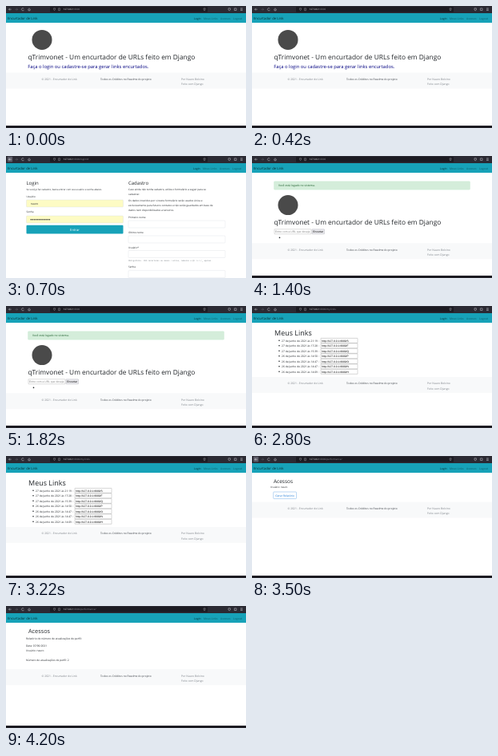
An HTML page that plays this animation: 300x153 px, repeating every 4.9 s.

```html
<!DOCTYPE html>
<html lang="pt">
<head>
<meta charset="utf-8">
<title>Encurtador de Link</title>
<style>
html, body { margin: 0; width: 100%; height: 100%; overflow: hidden; background: #fff; }
svg { display: block; width: 100%; height: 100%; }
text { font-family: "Open Sans", "Noto Sans", sans-serif; text-rendering: geometricPrecision; white-space: pre; }
.field { font-family: "Liberation Sans", Arial, sans-serif; }
.mono { font-family: "Noto Sans Mono", "DejaVu Sans Mono", monospace; }
</style>
</head>
<body>
<svg id="stage" viewBox="0 0 300 153" preserveAspectRatio="none"></svg>
<script>
const STEP = 700;
const INK = '#212529', TEAL = '#17a2b8', GRAY = '#7b8187';
const USER = 'nauro';

const text = (x, y, size, str, fill = INK, extra = '') =>
  `<text x="${x}" y="${y}" font-size="${size}" fill="${fill}" ${extra}>${str}</text>`;
const rect = (x, y, w, h, fill, stroke = 'none', r = 0, sw = .3) =>
  `<rect x="${x}" y="${y}" width="${w}" height="${h}" rx="${r}" fill="${fill}" stroke="${stroke}" stroke-width="${sw}"/>`;
const dot = (x, y, r, fill) => `<circle cx="${x}" cy="${y}" r="${r}" fill="${fill}"/>`;
const stroke = (d, color, w = .5) => `<path d="${d}" fill="none" stroke="${color}" stroke-width="${w}"/>`;

function browserBar(path, hover) {
  const icon = '#c9c9d0';
  return rect(0, 0, 300, 9, '#2b2a33') + rect(55, 1, 197, 6.8, '#1c1b22', 'none', .8) +
    (hover ? rect(1.8, .8, 6.4, 6.6, '#5b5a66', 'none', .8) : '') +
    stroke('M6.7 4.2H3.6M4.9 2.8L3.5 4.2L4.9 5.6', hover ? '#fff' : icon) +
    stroke('M11.4 4.2h3.1M13.2 2.8L14.6 4.2L13.2 5.6', '#66656f') +
    stroke('M22.2 3.2A1.6 1.6 0 1 0 22.5 4.8', icon) +
    stroke('M27.4 4.3L29 2.8L30.6 4.3M28 4v1.8h2V4', icon) +
    stroke('M59.6 2.8h1.9v1.6l-.95 1.3l-.95-1.3zM65.6 2.8h1.8v2.9h-1.8zM247 2.9h2.2l-.5 2.7h-1.2z', '#a5a5ae', .45) +
    text(71.8, 5.3, 3, `127.0.0.1<tspan fill="#8f8f98">:8000${path}</tspan>`, '#f4f4f8') +
    stroke('M278 2.8h2.4v2.2l-1.2 .8l-1.2-.8zM285.4 2.9h2.6v2.6h-2.6zM293 2.9h2.8M293 4.2h2.8M293 5.5h2.8', icon);
}

function navBar(shift = 0) {
  const items = [['Login', 235], ['Meus Links', 247], ['Acessos', 268], ['Logout', 284]];
  return rect(0, 9, 300, 12, TEAL) + text(2, 17, 4.25, 'Encurtador de Link', '#082a30') +
    items.map(([label, x], i) => text(x - shift, 16.7, 3.4, label, i ? '#0f5d6a' : '#06272d')).join('');
}

function footer(top) {
  return rect(0, top, 300, 20, '#f8f9fa') +
    text(44.5, top + 9.3, 3.4, '© 2021 - Encurtador de Link', GRAY) +
    text(118, top + 9.3, 3.36, 'Todos os Créditos no Readme do projeto', '#3f444a') +
    text(219, top + 9.3, 3.4, 'Por Nauro Belvino', GRAY) +
    text(219, top + 15.6, 3.4, 'Feito com Django', GRAY);
}

const page = (path, body, footerTop, hover) =>
  navBar() + browserBar(path, hover) + body + footer(footerTop) + rect(0, 150, 300, 3, '#1c1b22');

const banner = y => dot(45, y - 24.5, 12.5, '#4a4a4a') +
  text(27.5, y, 8.35, 'qTrimvonet - Um encurtador de URLs feito em Django');

const shortenForm = y => rect(28, y, 46, 6, '#fff', '#8a8a8a', .3) +
  text(29, y + 4.1, 3.4, 'Entre com a URL que deseja', '#858585', 'class="field"') +
  rect(75, y, 15.5, 6, '#e9e9ed', '#8f8f9d', .4) +
  text(82.7, y + 4.1, 3.4, 'Encurtar', '#000', 'class="field" text-anchor="middle"');

const linkBox = (x, y, code) => rect(x, y, 46, 5.9, '#fff', '#777', .3) +
  text(x + 1.3, y + 4.1, 3.3, 'http://127.0.0.1:8000/' + code, '#000', 'class="field"');

const formBox = (x, y, fill = '#fff') => rect(x, y, 121, 9, fill, '#ced4da', .9);

function loginPage() {
  const small = (x, y, str) => text(x, y, 3.1, str);
  const about = [
    [43.1, 'Caso ainda não tenha cadastro, utilize o formulário a seguir para se'],
    [49.1, 'cadastrar.'],
    [57.1, 'Os dados inseridos por si neste formulário serão usados única e'],
    [63.1, 'exclusivamente para futuros contatos e não serão guardados em base de'],
    [69.1, 'dados nem disponibilizados a terceiros.']];
  const fields = [['Primeiro nome', 78, 81], ['Último nome', 97, 100], ['Usuário*', 115.6, 118.5], ['Senha', 140.2, 143.6]];
  let dots = '';
  for (let i = 0; i < 12; i++) dots += dot(31.3 + i * 2.1, 79.7, .75, INK);
  return navBar(1) + browserBar('/login/#', true) +
    text(25.5, 36.2, 6, 'Login') + text(153, 36.2, 6, 'Cadastro') +
    text(25.5, 43.1, 2.95, 'Se você já fez cadastro, basta entrar com seu usuário e senha abaixo.') +
    small(25.5, 51.7, 'Usuário') + formBox(25.5, 55, '#fdfbc4') + text(31, 60.8, 3.3, USER) +
    small(25.5, 71.1, 'Senha') + formBox(25.5, 75, '#fdfbc4') + dots +
    rect(25.5, 86.8, 121, 10.6, TEAL, 'none', .9) +
    text(86, 93.6, 4.1, 'Entrar', '#fff', 'text-anchor="middle"') +
    about.map(([y, str]) => small(153, y, str)).join('') +
    fields.map(([label, y, top]) => small(153, y, label) + formBox(153, top)).join('') +
    text(153, 131.8, 2.4, 'Obrigatório. 150 caracteres ou menos. Letras, números e @/./+/-/_ apenas.', GRAY, 'class="mono"');
}

function linksBody() {
  const links = [
    ['27', '21:19', 'S'], ['27', '17:28', 'F'], ['27', '15:39', 'Q'], ['26', '14:50', 'P'],
    ['26', '14:47', 'O'], ['26', '14:47', 'N'], ['26', '14:09', 'H']];
  return text(28, 36.7, 9, 'Meus Links') + links.map(([day, hour, code], i) => {
    const y = 43.2 + i * 6.5;
    return dot(34, y, .8, INK) + text(37, y + 1.3, 3.3, `${day} de Junho de 2021 às ${hour} :`) +
      linkBox(86, y - 2.8, code);
  }).join('');
}

const reportForm = text(27, 33.8, 6.5, 'Acessos') +
  text(23, 40.4, 3.1, 'Usuário: ' + USER) +
  rect(26.7, 45, 28.8, 8.6, '#fff', '#3a8dde', .9, .35) +
  text(41.1, 50.6, 3.35, 'Gerar Relatório', '#1a78d6', 'text-anchor="middle"');

const report = text(28, 33.6, 7.3, 'Acessos') +
  [[42.3, 'Relatório de número de atualizações de perfil:'], [51.4, 'Data: 07/06/2021'],
   [57, 'Usuário: ' + USER], [68.9, 'Número de atualizações de perfil: 2']]
    .map(([y, str]) => text(25, y, 3.25, str)).join('');

const scenes = [
  page('', banner(66.9) +
    text(27.2, 78, 5.85, 'Faça o login ou cadastre-se para gerar links encurtados.', '#000080'), 83.6),
  loginPage(),
  page('', rect(27.5, 31.8, 245, 10.4, '#d4edda', '#c3e6cb', .9) +
    text(33, 38.3, 3.4, 'Você está logado no sistema.', '#155724') +
    banner(86.1) + shortenForm(91.8) + dot(34.5, 102.4, .8, INK), 109.3),
  page('', banner(66.1) + shortenForm(71.8) + dot(33.8, 83, .8, INK) +
    text(37, 84.2, 3.3, 'adicionar :') + linkBox(56, 80.4, 'S') + dot(103.6, 83.4, .5, INK), 90),
  page('/my-links', linksBody(), 89),
  page('/performance/', reportForm, 57.6, true),
  page('/performance/', report, 79.2)
];

const stage = document.getElementById('stage');
let shown = -1;
function draw() {
  const scene = Math.floor(performance.now() / STEP) % scenes.length;
  if (scene !== shown) stage.innerHTML = scenes[shown = scene];
  requestAnimationFrame(draw);
}
draw();
</script>
</body>
</html>
```
